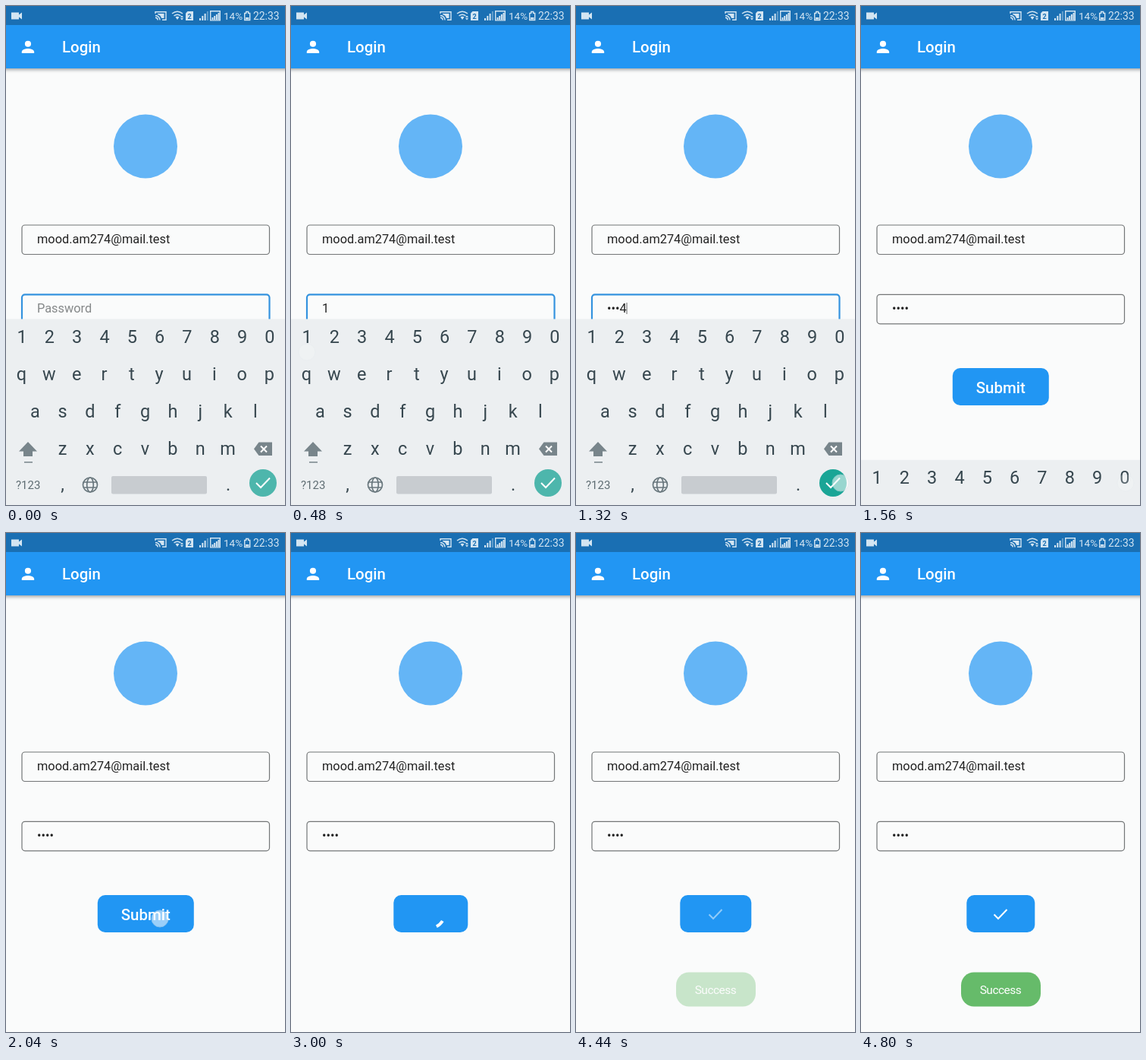
An HTML page that plays this animation: 368 px wide and 656 px high, repeating every 4920 ms.

```html
<!DOCTYPE html>
<html lang="en">
<head>
<meta charset="utf-8">
<title>Login form</title>
<style>
  html, body { margin: 0; width: 100%; height: 100%; overflow: hidden; background: #fafbfb; }
  svg { display: block; width: 100vw; height: 100vh; font-family: Roboto, sans-serif; }
  .field { fill: none; stroke: #737677; stroke-width: 1.2; }
  .line { fill: none; stroke: #fff; stroke-width: 2; }
  #status { fill: #d3e5f2; stroke: none; }
  #status .thin { fill: none; stroke: #d3e5f2; stroke-width: 1.4; }
  #keys { font-size: 23.5px; fill: #37474f; text-anchor: middle; }
</style>
</head>
<body>
<svg viewBox="0 0 368 656">
  <defs>
    <filter id="shadow" x="-5%" y="-20%" width="110%" height="160%">
      <feDropShadow dx="0" dy="2" stdDeviation="2" flood-opacity=".35"/>
    </filter>
  </defs>
  <rect width="368" height="656" fill="#fafbfb"/>
  <rect x="-8" y="10" width="384" height="72" fill="#2196f3" filter="url(#shadow)"/>
  <rect width="368" height="25" fill="#1a6fb3"/>

  <g id="status">
    <path d="M7 8.5h10v3l4-3v9l-4-3v3H7z"/>
    <path class="thin" d="M197 10V7.7h14v10.6h-5M197 12.5q5.500 .5 6 6M197 15.300q3 .2 3.200 3.200"/>
    <path d="M200 10h8.500v6h-3.500q-1-4-5-5z"/>
    <path class="thin" d="M219 10q7-5.500 14 0M221.500 13q4.500-3.500 9 0"/>
    <path d="M223.500 14.500q2.500-1.500 5 0l-2.500 3.500zM230 15l2-2.500 2 2.500zm0 1h4l-2 2.500z"/>
    <path d="M239.500 7h7.500v12h-10V9.500z"/>
    <text x="242" y="16.500" font-size="9" font-weight="700" text-anchor="middle" fill="#1a6fb3">2</text>
    <path d="M255 16h2v3h-2zm3.300-3h2v6h-2zm3.300-3h2v9h-2z"/>
    <path d="M264.900 7h2v12h-2z" opacity=".4"/>
    <path class="thin" d="M269.700 6.700h12.600v12.200h-12.600z"/>
    <path d="M271.500 15h2v3h-2zm2.700-2h2v5h-2zm2.700-2h2v7h-2zm2.600-2h2v9h-2z"/>
    <text x="287" y="18" font-size="13.500">14%</text>
    <path class="thin" d="M314.700 9.500h2v-2h3v2h2v9h-7z"/>
    <path d="M316 15h4.500v2.500h-4.500z"/>
    <text x="326" y="18" font-size="13.900">22:33</text>
  </g>

  <path transform="translate(16.700 41.600) scale(1.022)" fill="#fff"
    d="M12 12a4 4 0 1 0 0-8 4 4 0 0 0 0 8zm0 2c-2.670 0-8 1.340-8 4v2h16v-2c0-2.660-5.330-4-8-4z"/>
  <text x="74" y="61" font-size="20.440" font-weight="500" fill="#fff">Login</text>

  <circle cx="184" cy="184.500" r="42" fill="#64b5f6"/>

  <rect class="field" x="21" y="288" width="326.500" height="38.500" rx="4"/>
  <text x="41" y="312" font-size="16.350" fill="#222">mood.am274@mail.test</text>
  <rect class="field" id="password" x="21" y="379.300" width="326.500" height="38.500" rx="4"/>
  <text id="secret" x="41" y="403" font-size="16.350"></text>
  <path id="cursor" d="M67 390v15" stroke="#666"/>

  <rect id="button" y="476" height="49" rx="10" fill="#2196f3"/>
  <text id="submit" x="184.300" y="508.500" font-size="20.440" font-weight="500" fill="#fff" text-anchor="middle">Submit</text>
  <path id="spinner" class="line" style="stroke-width:4"/>
  <path id="tick" class="line" d="M175.500 501.500l5.500 5.500 11.500-12"/>

  <g id="toast">
    <rect x="132" y="577.500" width="105" height="45" rx="17" fill="#66bb6a"/>
    <text x="184" y="606" font-size="15.500" letter-spacing="-.5" fill="#fff" text-anchor="middle">Success</text>
  </g>

  <g id="keyboard">
    <rect y="411.500" width="368" height="250" fill="#eceff1"/>
    <g id="keys"></g>
    <g fill="#78858b">
      <path d="M29 573l12 12.500h-6v6.500h-12v-6.500h-6zM24 599h11v1.500h-11z"/>
      <path d="M333.500 573.500h17.500v17.500h-17.500l-6.500-8.750z"/>
      <path class="line" d="M336 578.500l8 8m0-8l-8 8"/>
    </g>
    <text x="13" y="635" font-size="15" fill="#5f6d73">?123</text>
    <g fill="none" stroke="#69777d" stroke-width="1.700">
      <circle cx="111" cy="629.500" r="9.500"/>
      <ellipse cx="111" cy="629.500" rx="4.300" ry="9.500"/>
      <path d="M102.500 626h17m-17 7h17"/>
    </g>
    <rect x="139" y="618" width="126" height="23.500" rx="2" fill="#c8ccd0"/>
    <circle id="done" cx="339" cy="627" r="18"/>
    <path class="line" d="M330 627l6 6 12-12.500"/>
  </g>
  <circle id="touch" r="11" fill="#fff" stroke="#dce5ea"/>
</svg>
<script>
const LOOP = 4920, STEP = 120;
const $ = id => document.getElementById(id);
const set = (id, attrs) => { for (const k in attrs) $(id).setAttribute(k, attrs[k]); };
const clamp = v => Math.max(0, Math.min(1, v));
const ramp = (t, from, to) => clamp((t - from) / (to - from));
const smooth = v => v * v * (3 - 2 * v);

// Cubic Bézier easing (.4, 0, .2, 1), solved by bisection
function ease(x) {
  let lo = 0, hi = 1, s = .5;
  for (let i = 0; i < 18; i++) {
    s = (lo + hi) / 2;
    const bx = 1.2 * s * (1 - s) ** 2 + .6 * s * s * (1 - s) + s ** 3;
    if (bx < x) lo = s; else hi = s;
  }
  return 3 * s * s - 2 * s ** 3;
}

const rows = [["1234567890", 21, 443], ["qwertyuiop", 20.5, 492],
  ["asdfghjkl", 38.3, 541], ["zxcvbnm", 74.5, 590], [",", 74.5, 637], [".", 293, 637]];
$("keys").innerHTML = rows.map(([chars, x, y]) => [...chars].map((c, i) =>
  `<text x="${x + i * 36.33}" y="${y}">${c}</text>`).join("")).join("");

const typed = [240, 600, 840, 1200];
// Press time, x, y
const taps = [[240, 21, 455], [600, 57, 455], [840, 93, 455], [1080, 130, 455],
  [1320, 349, 627], [1920, 203, 507]];

function arc(ms) {
  const u = ms / 1333 % 1, turn = ms / 2222 % 1;
  const head = ease(clamp(2 * u)), tail = ease(clamp(2 * u - 1));
  const start = Math.PI * (-.5 + 1.5 * tail + 2 * turn + .5 * u);
  const sweep = Math.max(.001, 1.5 * Math.PI * (head - tail));
  const at = a => `${184 + 18.5 * Math.cos(a)} ${500.5 + 18.5 * Math.sin(a)}`;
  return `M${at(start)}A18.5 18.5 0 ${+(sweep > Math.PI)} 1 ${at(start + sweep)}`;
}

function draw(t) {
  const count = typed.filter(at => t >= at).length;
  const focused = t < 1440;
  const last = t < 1560 && count ? count : "";
  $("secret").textContent = count ? "•".repeat(count - (last ? 1 : 0)) + last : "Password";
  set("secret", { fill: count ? "#222" : "#858889" });
  set("cursor", { opacity: +(t >= 1200 && focused) });
  $("password").style.cssText = focused ? "stroke:#3493df;stroke-width:2.2" : "";

  set("keyboard", { transform: `translate(0 ${250 * smooth(ramp(t, 1320, 1680))})` });
  set("done", { fill: t >= 1320 ? "#1aa596" : "#4db6ac" });

  const tap = taps.findLast(([at]) => t >= at);
  set("touch", tap
    ? { cx: tap[1], cy: tap[2], opacity: .55 * (1 - ramp(t, tap[0] + 120, tap[0] + 300)) }
    : { opacity: 0 });

  const shrink = smooth(ramp(t, 2040, 2400));
  const width = 127 - 29 * shrink - 8 * smooth(ramp(t, 4320, 4560));
  set("button", { x: 184.3 - width / 2, width });
  set("submit", { opacity: 1 - ramp(t, 2040, 2280) });
  set("spinner", { d: arc(Math.max(0, t - 2020) * 1.088),
    opacity: ramp(t, 2040, 2280) * (t < 4440) });
  set("tick", { opacity: ramp(t, 4320, 4560) });
  set("toast", { opacity: ramp(t, 4320, 4680) });
}

const begin = performance.now();
function frame() {
  const t = (performance.now() - begin) % LOOP;
  draw(Math.floor(t / STEP) * STEP);
  requestAnimationFrame(frame);
}
frame();
</script>
</body>
</html>
```
